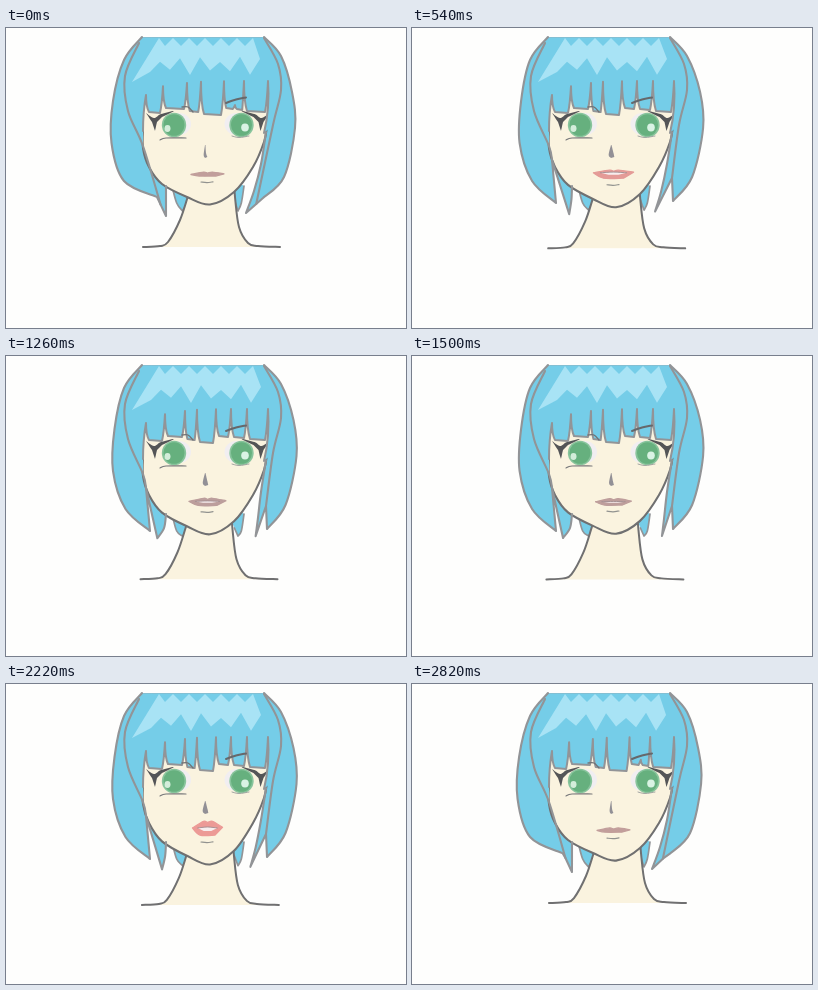
Animation, 400 px wide and 300 px high, one loop 2.88 s. Source, as an HTML page with a canvas:

```html
<!DOCTYPE html>
<html lang="en">
<head>
<meta charset="utf-8">
<title>Talking portrait</title>
<style>
html, body { margin: 0; width: 100%; height: 100%; overflow: hidden; background: #fefefd; }
canvas { display: block; width: 400px; height: 300px; }
</style>
</head>
<body>
<canvas id="stage" width="400" height="300"></canvas>
<script>
const ctx = document.getElementById('stage').getContext('2d');
const LOOP = 2880, STEP = 60;
const HAIR = '#75cde8', SHINE = '#a8e3f5', SKIN = '#faf3df';
const GREY = '#929497', DARK = '#707071', LASH = '#545557';

const mix = (a, b, k) => a + (b - a) * k;
const blend = (a, b, k) => a.map((v, i) => mix(v, b[i], k));
const wave = (t, period) => 0.5 - 0.5 * Math.cos(2 * Math.PI * t / period);

// Smooth curve through flat x,y points.
function curve(p, join) {
  const n = p.length / 2;
  const at = i => {
    i = Math.max(0, Math.min(n - 1, i));
    return [p[2 * i], p[2 * i + 1]];
  };
  if (join) ctx.lineTo(p[0], p[1]); else ctx.moveTo(p[0], p[1]);
  for (let i = 0; i < n - 1; i++) {
    const [a, b, c, d] = [at(i - 1), at(i), at(i + 1), at(i + 2)];
    ctx.bezierCurveTo(b[0] + (c[0] - a[0]) / 6, b[1] + (c[1] - a[1]) / 6,
      c[0] - (d[0] - b[0]) / 6, c[1] - (d[1] - b[1]) / 6, c[0], c[1]);
  }
}

function path(parts) {
  ctx.beginPath();
  parts.forEach((p, i) => curve(p, i > 0));
}

function line(color, width, ...parts) {
  path(parts);
  ctx.strokeStyle = color;
  ctx.lineWidth = width;
  ctx.stroke();
}

function fill(color, ...parts) {
  path(parts);
  ctx.fillStyle = color;
  ctx.fill();
}

function disc(x, y, rx, ry, color) {
  ctx.beginPath();
  ctx.ellipse(x, y, rx, ry, 0, 0, 2 * Math.PI);
  ctx.fillStyle = color;
  ctx.fill();
}

function neck(d) {
  for (const [x, lean, y] of [[166, 14, 158], [238, -8, 158]]) {
    const lock = [x, y, x + lean / 3, y + 17, x + lean * 0.75, y + 25 - 3 * d];
    fill(HAIR, lock, [x + lean * 1.4, y + 10, x + lean, y - 5]);
    line(GREY, 1.7, lock, [x + lean * 1.2, y + 14]);
  }
  ctx.save();
  ctx.translate(-2.6 * d, 4.4 * d);
  const left = [187, 152, 182, 168, 174, 192, 162, 214, 154, 218, 137, 219];
  const right = [274, 219, 252, 218, 242, 215, 233, 199, 229, 169, 228, 152];
  fill(SKIN, left, right);
  line(DARK, 2, left);
  line(DARK, 2, right);
  ctx.restore();
}

// One side of the bob: outer edge, a notch that opens with the sway, inner lock.
function side({ edge, end, notch, tip, inner, seam, top }, open) {
  const gap = blend(blend(end, tip, 0.4), notch, open);
  const outline = [[...edge, ...end], gap, [...tip, ...inner]];
  fill(HAIR, ...outline, top);
  return () => {
    line(GREY, 2.1, ...outline);
    line(GREY, 2.1, [...seam, ...gap]);
  };
}

function sides(w, open, d) {
  const s = 1.5 * w;
  const left = side({
    edge: [136, 9, 118, 32, 107 + s, 73, 105.5 + s, 115, 118 + s, 153],
    end: blend([151, 169], [144, 175], open),
    notch: [140, 132],
    tip: [160 - 9 * d, 188 - 6 * d],
    inner: [160 - 2 * d, 172, 160, 158],
    seam: [133, 15, 119, 48, 122, 83, 137, 118],
    top: [150, 80, 150, 9]
  }, open);
  const right = side({
    edge: [258, 9, 275, 28, 286 + s, 64, 289 + s, 100, 278 + s, 149],
    end: blend([257, 170], [261, 173], open),
    notch: [260, 150],
    tip: [240 + 10 * d, 185 - 5 * d],
    inner: [248 + 4 * d, 163, 255, 136, 260, 104],
    seam: [258, 10, 272, 36, 275, 62, 267, 97],
    top: [250, 80, 250, 9]
  }, open);
  return () => { left(); right(); };
}

function face(chin) {
  const k = chin - 176.5;
  const jaw = [137, 100, 137, 120, 143, 139, 156, 156 + k / 3, 181, 169 + k * 0.7,
    204, chin, 228, 164 + k * 0.7, 247, 139, 258, 114, 261, 98];
  fill(SKIN, jaw, [264, 60], [138, 60]);
  return () => line(DARK, 2.1, jaw);
}

// dir points from the nose outwards.
function eye(x, y, dir) {
  disc(x - 5 * dir, y - 1, 12, 11, '#f1eef1');
  disc(x, y, 12.2, 12.2, '#88c49c');
  disc(x, y, 10.5, 10.8, '#66b07e');
  const at = (...p) => p.map((v, i) => i % 2 ? y + v : x + dir * v);
  fill(LASH, at(28, -12, 20, -7, 13, -11, 0, -14, 12, -8), at(17, -3, 19, 6), at(22, -3, 28, -12));
}

function features() {
  eye(168, 97, -1);
  eye(235.5, 97, 1);
  disc(161.5, 100.5, 3, 3.4, '#d3edda');
  disc(239, 99.5, 3.8, 4, '#d9f3e4');
  line('#77787a', 1.2, [154, 112, 160, 110, 180, 110]);
  line('#a2a5a2', 1, [226, 108, 233, 109.5, 243, 108]);
}

// time, mouth width, openness, pinkness
const speech = [
  [0, 33, 0, 0.1], [300, 41, 1, 0.7], [840, 39, 0.25, 1], [1260, 37, 0.45, 0],
  [1800, 34, 0.1, 0.1], [2220, 30, 1, 1], [LOOP, 33, 0, 0.1]
];

function mouthAt(t) {
  const i = speech.findIndex(k => k[0] > t);
  const a = speech[i - 1], b = speech[i];
  const k = (t - a[0]) / (b[0] - a[0]);
  return blend(a, b, k * k * (3 - 2 * k)).slice(1);
}

function mouth(width, open, pink) {
  const x = 201.5, y = 146.5 - 2.5 * open, h = width / 2;
  const up = 2.4 + open * (41 - width) * 0.38, low = 1.6 + 5.5 * open;
  const color = `rgb(${blend([188, 158, 156], [236, 154, 150], pink).map(Math.round)})`;
  const lips = [[x - h, y, x - 4, y - up, x, y - up + 1, x + 5, y - up, x + h, y - 0.6],
    [x + h / 2, y + low, x - h / 2, y + low, x - h, y]];
  fill(color, ...lips);
  line(color, 1.3, ...lips);
  if (open > 0.2) {
    const teeth = [x - h * 0.65, y, x, y - open, x + h * 0.65, y];
    fill('#f7eeee', teeth, [x + h / 4, y + 3 * open, x - h / 4, y + 3 * open]);
    line('#a08c8f', 0.9, teeth);
  }
  const crease = 154 + 4 * open;
  line('#91928f', 1.2, [195, crease, 201, crease + 0.6, 207, crease - 0.2]);

  const nose = 1 + 3 * Math.min(1, 2 * open);
  fill('#929096', [199.5, 117, 199.5 + nose / 2, 125, 201 + nose / 3, 129],
    [199, 130, 198 - nose / 3, 127, 199, 117]);
}

function shine(open) {
  const teeth = 11;
  ctx.beginPath();
  ctx.moveTo(153, 10);
  ctx.lineTo(126, 54);
  for (let i = 0; i <= teeth; i++)
    ctx.lineTo(144 + i * 10 + open, (i % 2 ? 31 : 44) + 3 * Math.sin(i * 2));
  for (let i = teeth; i >= 0; i--)
    ctx.lineTo(159 + i * 8, i % 2 ? 10 : 18);
  ctx.fillStyle = SHINE;
  ctx.fill();
}

// Blunt locks hang between notches; one lock splits in two as the hair sways.
const notchX = [140, 157, 181, 195, 218, 229, 238, 262];
const notchSway = [140, 159, 179, 191, 210, 225, 241, 262];
const lockEnd = [84, 80, 83, 86, 80, 81, 83];

function fringe(open) {
  const xs = blend(notchX, notchSway, open);
  const root = i => 53 + 14 * Math.exp(-i) + (i === 5 ? 24 * (1 - open) : 0);
  const locks = () => {
    ctx.lineTo(137, 103);
    ctx.quadraticCurveTo(137, 84, xs[0], root(0));
    lockEnd.forEach((y, i) => {
      const l = xs[i], r = xs[i + 1], in_ = Math.min(3, (r - l) / 5);
      ctx.quadraticCurveTo(l, mix(root(i), y, 0.7), l + in_, y);
      ctx.lineTo(r - in_, y + 1);
      ctx.quadraticCurveTo(r - 1, mix(y, root(i + 1), 0.3), r, root(i + 1));
    });
    ctx.quadraticCurveTo(264, 80, 258, 105);
  };
  path([[136, 9, 119, 48, 122, 83, 137, 118]]);
  locks();
  ctx.lineTo(267, 97);
  curve([267, 97, 275, 62, 272, 36, 258, 9], true);
  ctx.fillStyle = HAIR;
  ctx.fill();
  shine(open);

  ctx.beginPath();
  locks();
  ctx.strokeStyle = GREY;
  ctx.lineWidth = 2;
  ctx.stroke();
  line('#83bfd3', 1, [136, 9.5, 256, 9.5]);
  line('#707173', 1.3, [176, 79, 182, 79, 187, 84]);
  line('#66686b', 2, [220, 75, 230, 71.5, 240, 69.5]);
}

function draw(t) {
  const breath = wave(t, LOOP);
  const sway = wave(t, LOOP / 3) / 0.69;
  const open = Math.min(1, sway);
  const talk = mouthAt(t);
  ctx.fillStyle = '#fefefd';
  ctx.fillRect(0, 0, 400, 300);
  ctx.lineCap = ctx.lineJoin = 'round';
  neck(breath);
  const hairLines = sides(sway, open, breath);
  const jawLine = face(176.5 + 4 * talk[1]);
  features();
  mouth(...talk);
  jawLine();
  fringe(open);
  hairLines();
}

const start = performance.now();
function tick() {
  const t = (performance.now() - start) % LOOP;
  draw(Math.floor(t / STEP) * STEP);
  requestAnimationFrame(tick);
}
tick();
</script>
</body>
</html>
```
